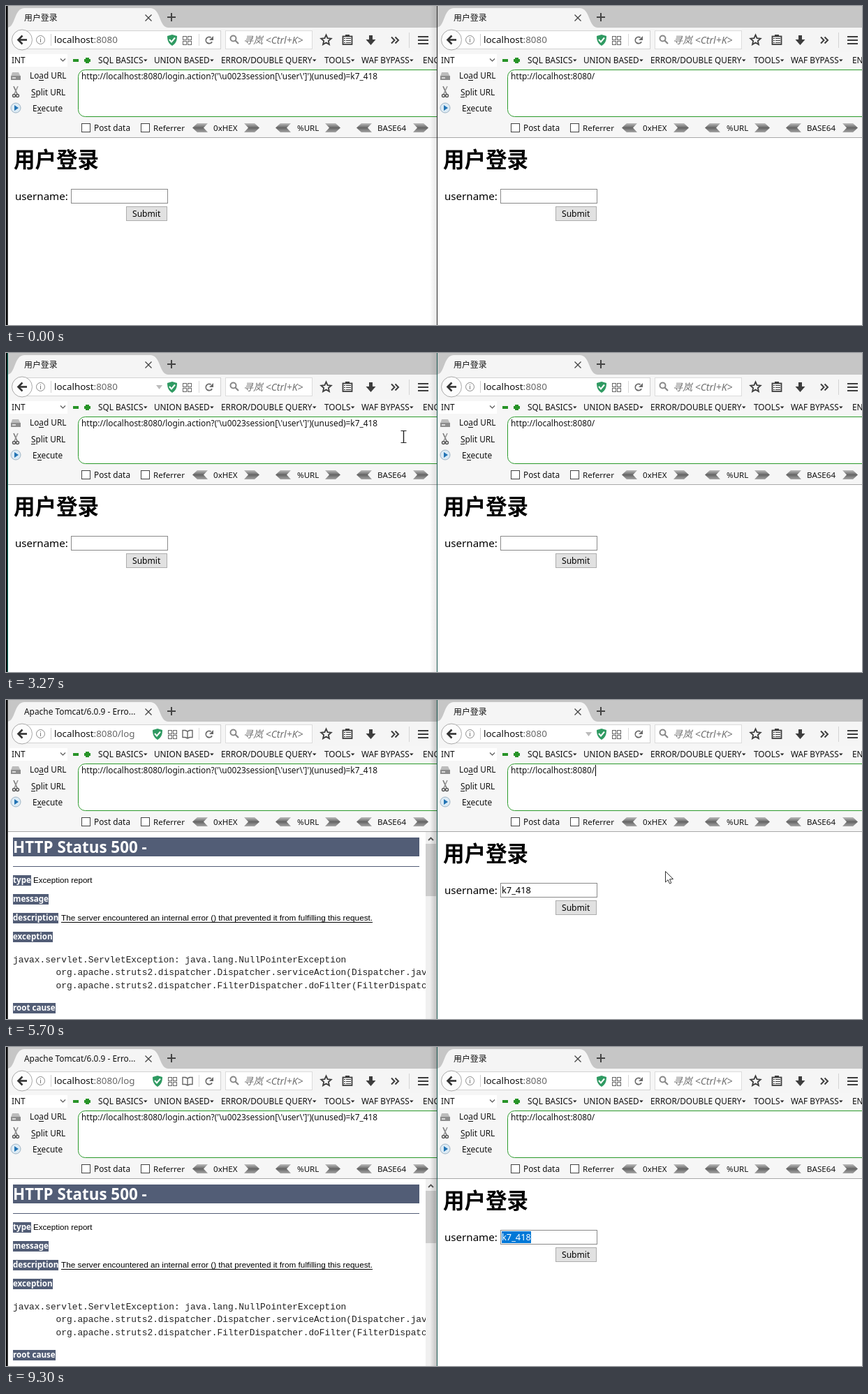
An HTML page with a canvas that plays this animation: 1226 px wide and 457 px high, repeating every 9380 ms.

```html
<!DOCTYPE html>
<html lang="zh">
<head>
<meta charset="utf-8">
<title>Session demo</title>
<style>
html, body { margin: 0; width: 100%; height: 100%; overflow: hidden; background: #fff; }
canvas { display: block; }
</style>
</head>
<body>
<canvas id="stage" width="1226" height="457"></canvas>
<script>
const c = document.getElementById('stage').getContext('2d');
const LOOP = 9380, TICKS = 120;
const SANS = '"Noto Sans", "Noto Sans CJK SC", "Noto Sans CJK", sans-serif';
const ARIAL = '"Liberation Sans", Arial, sans-serif';
const MONO = '"Liberation Mono", monospace';
const USER = 'k7_418';
const BASE = 'http://localhost:8080/';
const ATTACK = BASE + "login.action?('\\u0023session[\\'user\\']')(unused)=" + USER;
const SLATE = '#525d76';

// Pointer path: tick, x, y
const PATH = [
  [1, 1133, 425], [4, 1085, 330], [7, 985, 170], [10, 915, 62], [12, 902, 44], [14, 901, 43],
  [27, 902, 43], [28, 800, 66], [29, 714, 72], [30, 650, 92], [32, 585, 116], [35, 569, 120],
  [50, 569, 120], [52, 610, 112], [55, 780, 78], [58, 908, 48], [61, 912, 45], [63, 907, 43],
  [70, 905, 43], [71, 912, 90], [73, 944, 245], [74, 1034, 340], [75, 1000, 430], [76, 830, 436],
  [77, 648, 390], [78, 715, 365], [80, 912, 413], [86, 912, 413], [90, 806, 350], [93, 721, 299],
  [95, 713, 297], [96, 713, 297], [98, 728, 278], [100, 754, 271], [101, 754, 271],
  [105, 682, 270], [106, 682, 270], [109, 850, 350], [111, 1021, 432]
];

const within = (k, a, b) => k >= a && k < b;

function pointer(k) {
  if (k < 1 || k > 111) return null;
  let i = 1;
  while (PATH[i][0] < k) i++;
  const [t0, x0, y0] = PATH[i - 1], [t1, x1, y1] = PATH[i];
  const p = (k - t0) / (t1 - t0);
  return { x: Math.round(x0 + (x1 - x0) * p), y: Math.round(y0 + (y1 - y0) * p) };
}

function rect(x, y, w, h, fill, stroke) {
  if (fill) { c.fillStyle = fill; c.fillRect(x, y, w, h); }
  if (stroke) { c.strokeStyle = stroke; c.lineWidth = 1; c.strokeRect(x + .5, y + .5, w - 1, h - 1); }
}

function text(s, x, y, size, color = '#111', style = '', family = SANS) {
  c.font = `${style} ${size}px ${family}`;
  c.fillStyle = color;
  c.fillText(s, x, y);
  return c.measureText(s).width;
}

function line(pts, color, width = 1, close = false) {
  c.beginPath();
  for (let i = 0; i < pts.length; i += 2) c.lineTo(pts[i], pts[i + 1]);
  if (close) c.closePath();
  c.strokeStyle = color;
  c.lineWidth = width;
  c.stroke();
}

function poly(pts, fill) {
  c.beginPath();
  for (let i = 0; i < pts.length; i += 2) c.lineTo(pts[i], pts[i + 1]);
  c.fillStyle = fill;
  c.fill();
}

function disc(x, y, r, fill, stroke, width = 1) {
  c.beginPath();
  c.arc(x, y, r, 0, 7);
  if (fill) { c.fillStyle = fill; c.fill(); }
  if (stroke) { c.strokeStyle = stroke; c.lineWidth = width; c.stroke(); }
}

function clipped(x, y, w, h, draw) {
  c.save();
  c.beginPath();
  c.rect(x, y, w, h);
  c.clip();
  draw();
  c.restore();
}

function accessText(s, at, x, y) {
  text(s, x, y, 11.8);
  const a = c.measureText(s.slice(0, at)).width, w = c.measureText(s[at]).width;
  rect(Math.round(x + a), y + 2, Math.round(w), 1, '#111');
}

function tabStrip(title) {
  rect(2, 0, 1224, 31, '#c6c6c6');
  c.beginPath();
  c.moveTo(2, 31);
  c.bezierCurveTo(14, 30, 11, 4, 26, 3);
  c.lineTo(207, 3);
  c.bezierCurveTo(222, 4, 219, 30, 232, 31);
  c.fillStyle = '#f5f5f5';
  c.fill();
  text(title, 26, 21, 11.9);
  line([199.5, 12.5, 208.5, 21.5], '#444', 1.3);
  line([208.5, 12.5, 199.5, 21.5], '#444', 1.3);
  rect(231, 15, 12, 2, '#444');
  rect(236, 10, 2, 12, '#444');
}

function shield(x) {
  c.beginPath();
  c.moveTo(x, 41);
  c.lineTo(x + 7, 43);
  c.bezierCurveTo(x + 7, 50, x + 5, 54, x, 57);
  c.bezierCurveTo(x - 5, 54, x - 7, 50, x - 7, 43);
  c.fillStyle = '#2f9a62';
  c.fill();
  line([x - 4, 48, x - 1, 51.5, x + 4, 45.5], '#fff', 2);
}

function gridIcon(x) {
  for (const dx of [-6, 1]) for (const dy of [-6, 1])
    rect(x + dx, 49 + dy, 6, 6, null, '#666');
}

function navBar(w) {
  rect(2, 31, 1224, 36, '#f5f5f5');
  rect(24, 35, 284, 27, '#fff', '#d2d2d2');
  disc(23, 48.5, 14.5, '#fcfcfc', '#aaa');
  line([30, 48.5, 18, 48.5], '#333', 2.6);
  line([23.5, 42.5, 17.5, 48.5, 23.5, 54.5], '#333', 2.6);
  disc(49.5, 48.5, 6, null, '#8a8a8a');
  rect(49, 47, 1, 5, '#777');
  rect(49, 45, 1, 1, '#777');
  rect(64, 40, 1, 17, '#d0d0d0');

  const host = text('localhost', 69, 53, 13.4, '#111');
  text(w.error ? ':8080/log' : ':8080', 69 + host, 53, 13.4, '#666');
  const sx = w.error ? 217 : 238;
  if (w.drop > 0) {
    c.globalAlpha = w.drop;
    poly([sx - 23, 46, sx - 14, 46, sx - 18.5, 52], '#bbb');
    c.globalAlpha = 1;
  }
  shield(sx);
  gridIcon(sx + 21);
  if (w.error) {
    line([260, 45, 257, 43.5, 253, 43.5, 253, 53.5, 257, 53.5, 260, 55, 263, 53.5, 267, 53.5, 267, 43.5, 263, 43.5, 260, 45, 260, 55], '#666', 1.4);
  }
  rect(276, 40, 1, 17, '#d8d8d8');

  const ink = w.busy ? '#b4b4b4' : '#6a6a6a';
  c.beginPath();
  c.arc(291, 49, 4.7, .5, 5.3);
  c.strokeStyle = ink;
  c.lineWidth = 1.8;
  c.stroke();
  poly([297, 43, 297, 49, 291, 49], ink);

  rect(314, 35, 125, 27, '#fff', '#dcdcdc');
  disc(325.5, 46.5, 4, null, '#888', 2);
  line([328.5, 49.5, 333, 54], '#888', 2.2);
  text('寻岚 <Ctrl+K>', 340, 53.5, 14, '#707070', 'italic');

  const star = [];
  for (let i = 0; i < 10; i++) {
    const r = i % 2 ? 3.5 : 7.6, a = i * Math.PI / 5 - Math.PI / 2;
    star.push(458.5 + r * Math.cos(a), 49 + r * Math.sin(a));
  }
  line(star, '#3d3d3d', 1.8, true);
  c.strokeRect(482.5, 43.5, 13, 11.5);
  rect(486, 41, 6, 3, '#3d3d3d');
  for (const y of [46, 49, 52]) {
    rect(484, y, 2, 1, '#3d3d3d');
    rect(487, y, 7, 1, '#3d3d3d');
  }
  rect(520, 42, 5, 7, '#3d3d3d');
  poly([515.5, 48, 529.5, 48, 522.5, 56], '#3d3d3d');
  for (const x of [552, 557.5]) line([x, 44.5, x + 4.5, 49, x, 53.5], '#3d3d3d', 2);
  rect(577, 38, 1, 22, '#d4d4d4');
  for (const y of [43, 48, 53]) rect(590, y, 15, 2, '#3d3d3d');
}

function ribbon(x, dir) {
  c.save();
  c.translate(x + 11, 174.5);
  c.scale(dir, 1);
  const g = c.createLinearGradient(0, -7, 0, 7);
  g.addColorStop(0, '#c4c4c4');
  g.addColorStop(.5, '#666');
  g.addColorStop(1, '#aaa');
  poly([-11, 0, -4, -6.5, 11, -6.5, 5, 0, 11, 6.5, -4, 6.5], g);
  c.restore();
}

function toolbar(w) {
  rect(2, 66, 1224, 123, '#f6f6f6');
  rect(5, 69, 83, 18, '#fff');
  text('INT', 8, 82, 11.8);
  line([78, 75.5, 81.5, 79, 85, 75.5], '#555', 1.1);
  rect(96, 76, 8, 4, '#279327');
  rect(112, 76, 9, 4, '#279327');
  rect(114, 74, 5, 8, '#279327');
  if (w.menu) rect(124, 68, 81, 20, '#d9ebf7');
  const menus = { 'SQL BASICS': 132, 'UNION BASED': 212, 'ERROR/DOUBLE QUERY': 308, 'TOOLS': 456, 'WAF BYPASS': 509, 'ENCODING': 597 };
  for (const [label, x] of Object.entries(menus)) {
    const e = x + text(label, x, 82, 11.8);
    poly([e + .5, 76.5, e + 6, 76.5, e + 3.2, 79.5], '#222');
  }

  c.beginPath();
  c.roundRect(103.5, 91.5, 640, 67, 10);
  c.fillStyle = '#fff';
  c.fill();
  c.strokeStyle = '#2b9a2b';
  c.lineWidth = 1;
  c.stroke();
  text(w.url, 108, 105, 11.88);
  if (w.caret) rect(w.caretX, 93, 1, 16, '#000');

  accessText('Load URL', 2, 34, 104);
  accessText('Split URL', 0, 36, 128);
  accessText('Execute', 1, 38, 151);
  poly([9, 95, 18, 95, 21, 101, 7, 101], '#bcbcbc');
  rect(7, 100, 14, 6, '#8d8d8d');
  rect(9, 102, 5, 2, '#d8d8d8');
  line([11, 115, 16, 126], '#777', 1.6);
  line([17, 115, 12, 126], '#999', 1.6);
  disc(11.5, 128.5, 2, null, '#555', 1.4);
  disc(16.5, 128.5, 2, null, '#555', 1.4);
  disc(14, 146, 7, '#dcebf5', '#9fb4c4');
  poly([12, 142, 18, 146, 12, 150], '#2374b5');

  rect(108, 168, 13, 13, '#fff', '#444');
  rect(193, 168, 13, 13, '#fff', '#444');
  text('Post data', 126, 179, 11.8);
  text('Referrer', 211, 179, 11.6);
  text('0xHEX', 297, 178.5, 11.6);
  text('%URL', 417, 178.5, 11.6);
  text('BASE64', 532, 178.5, 11.6);
  for (const x of [267, 386, 502]) ribbon(x, 1);
  for (const x of [341, 457, 583]) ribbon(x, -1);
  rect(2, 188, 1224, 1, '#a9a9a9');
}

function loginPage(w) {
  text('用户登录', 11, 230.5, 30.5, '#000', 'bold');
  text('username:', 13, 278, 15.1, '#000');
  rect(93, 262, 139, 21, '#fff', w.hover ? '#171717' : '#8a8a8a');
  if (w.value) text(w.value, 95, 277, 12.8, '#000');
  if (w.select) {
    clipped(w.select, 264, 137 - w.select, 17, () => {
      rect(93, 264, 60, 17, '#0078d7');
      text(w.value, 95, 277, 12.8, '#fff');
    });
  }
  rect(172, 287, 59, 21, '#e1e1e1', '#adadad');
  text('Submit', 181, 302, 12.1, '#000');
}

function errorPage() {
  rect(10, 197, 582, 27, SLATE);
  text('HTTP Status 500 -', 10, 219, 22.4, '#fff', 'bold');
  rect(10, 238, 582, 1, SLATE);
  const labels = { type: 262, message: 289, description: 316, exception: 343, 'root cause': 445 };
  for (const [label, y] of Object.entries(labels)) {
    c.font = `bold 11.6px ${SANS}`;
    rect(10, y - 11, Math.round(c.measureText(label).width), 15, SLATE);
    text(label, 10, y, 11.6, '#fff', 'bold');
  }
  text('Exception report', 39, 262, 11.6, '#000', '', ARIAL);
  const u = text('The server encountered an internal error () that prevented it from fulfilling this request.', 79, 316, 11.75, '#000', '', ARIAL);
  rect(79, 318, Math.round(u), 1, '#000');
  const pkg = ' '.repeat(8) + 'org.apache.struts2.dispatcher.';
  clipped(2, 360, 599, 60, () => {
    [
      'javax.servlet.ServletException: java.lang.NullPointerException',
      pkg + 'Dispatcher.serviceAction(Dispatcher.java',
      pkg + 'FilterDispatcher.doFilter(FilterDispatcher.java'
    ].forEach((s, i) => text(s, 10, 375.5 + i * 18.5, 12.83, '#222', '', MONO));
  });
  rect(601, 189, 16, 268, '#f0f0f0');
  line([605, 201, 608.5, 197.5, 612, 201], '#555', 1.8);
  rect(601, 206, 15, 75, '#cdcdcd');
}

function browser(dx, width, w) {
  c.save();
  c.translate(dx, 0);
  clipped(2, 0, width, 457, () => {
    rect(2, 0, width, 457, '#fff');
    tabStrip(w.title);
    navBar(w);
    toolbar(w);
    w.error ? errorPage() : loginPage(w);
  });
  c.restore();
}

function drawPointer(p, k) {
  const inField = within(k, 98, 108);
  const inArea = p.y > 91 && p.y < 159 && (p.x > 718 || within(p.x, 103, 617));
  if (inField || inArea) {
    line([p.x - 3.5, p.y - 8.5, p.x + 4.5, p.y - 8.5], '#222');
    line([p.x - 3.5, p.y + 8.5, p.x + 4.5, p.y + 8.5], '#222');
    line([p.x + .5, p.y - 8, p.x + .5, p.y + 8], '#222', 1.4);
    return;
  }
  const shape = [0, 0, 0, 15.5, 3.6, 12.2, 6, 17.6, 8.4, 16.5, 6, 11.3, 11, 11];
  const pts = shape.map((v, i) => v + (i % 2 ? p.y : p.x) + .5);
  poly(pts, '#fff');
  line(pts, '#333', 1, true);
}

// Blinking caret: on at the focus tick, then toggling about every 530 ms
const blink = (k, start) => Math.floor((k - start) / 6.8) % 2 === 0;

function draw(k) {
  const p = pointer(k);
  const leftActive = within(k, 35, 58), rightActive = within(k, 12, 35) || within(k, 58, 119);
  const waiting = '正在连接…', login = '用户登录';
  const failed = k >= 45;

  browser(0, 615, {
    title: failed ? 'Apache Tomcat/6.0.9 - Erro...' : k === 44 ? waiting : login,
    url: ATTACK, caretX: 532,
    caret: leftActive && blink(k, k < 44 ? 35 : 44),
    drop: within(k, 31, 53) ? 1 : k === 53 ? .5 : 0,
    busy: k === 44, error: failed
  });

  let select = 0;
  if (within(k, 102, 119)) select = Math.max(95, (k < 105 ? p.x : 682) - 615);
  browser(615, 609, {
    title: within(k, 22, 24) || k === 68 ? waiting : login,
    url: BASE, caretX: 229,
    caret: within(k, 12, 35) ? blink(k, 12) : within(k, 58, 97) && blink(k, 58),
    drop: within(k, 8, 31) || within(k, 53, 74) ? 1 : k === 31 || k === 74 ? .5 : 0,
    busy: within(k, 12, 26) || within(k, 64, 70),
    menu: within(k, 28, 30),
    value: k >= 69 ? USER : '',
    hover: within(k, 98, 104), select
  });

  const shade = c.createLinearGradient(607, 0, 617, 0);
  shade.addColorStop(0, 'rgba(0,0,0,0)');
  shade.addColorStop(1, rightActive ? 'rgba(0,0,0,.2)' : 'rgba(0,0,0,.1)');
  rect(607, 0, 10, 457, shade);
  rect(0, 0, 2, 457, '#000');
  rect(2, 0, 1, 457, leftActive ? '#167a6b' : '#555');
  rect(617, 0, 1, 457, rightActive || leftActive ? '#1d5a54' : '#2a2a2a');
  if (p) drawPointer(p, k);
}

function loop(now) {
  const t = now % LOOP;
  draw(Math.min(TICKS - 1, Math.floor((t + 20 * (1 - t / LOOP)) / (LOOP / TICKS))));
  requestAnimationFrame(loop);
}
requestAnimationFrame(loop);
</script>
</body>
</html>
```
